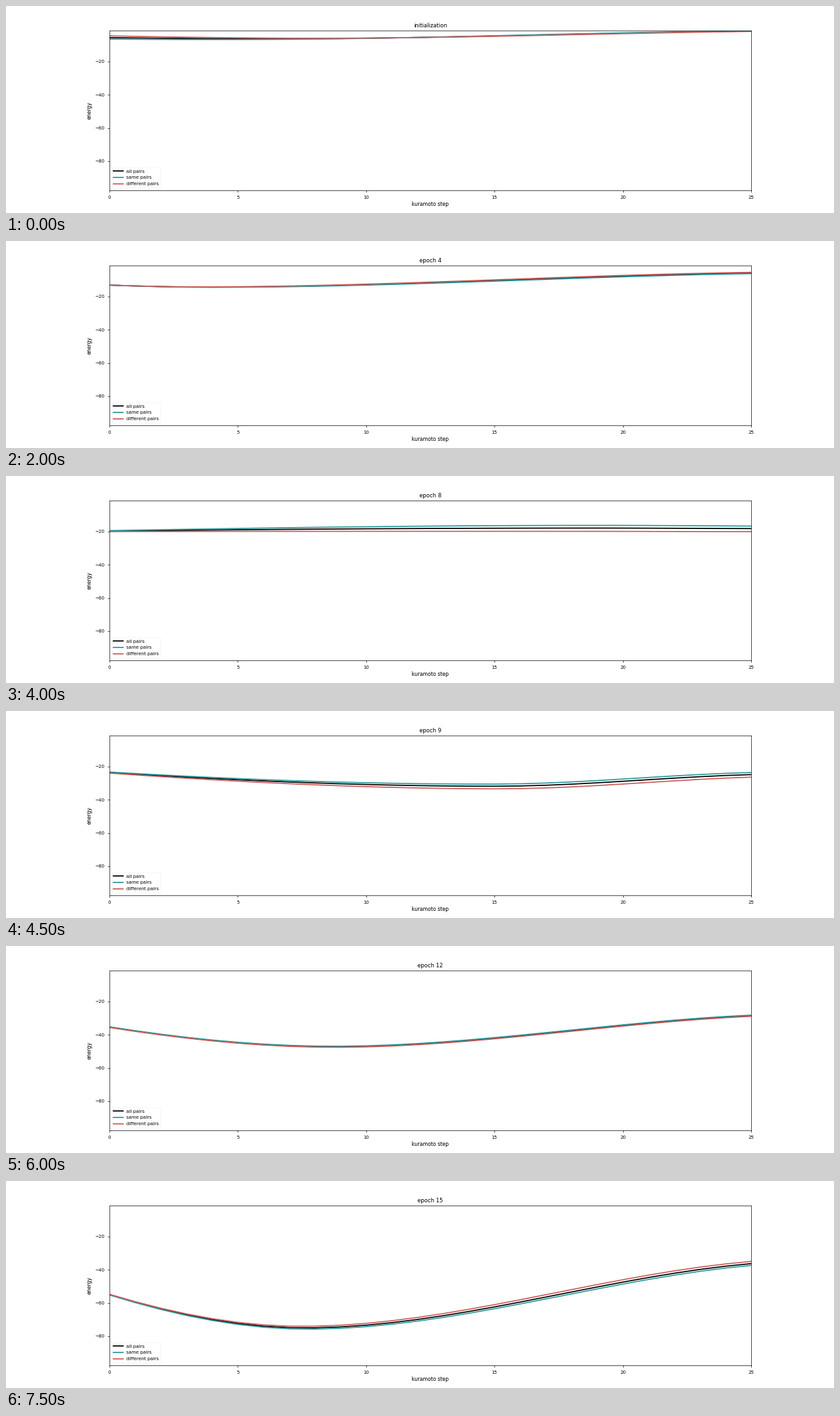
Animation of 1280x320 px, one loop 8 s. Source, as a matplotlib script:

```python
import numpy as np
import matplotlib.pyplot as plt
from matplotlib.animation import FuncAnimation

plt.rcParams.update({
    "font.family": "DejaVu Sans",
    "axes.titlesize": 9.6,
    "axes.labelsize": 8.8,
    "xtick.labelsize": 8,
    "ytick.labelsize": 8,
    "legend.fontsize": 8,
    "legend.labelspacing": 0.55,
    "xtick.major.pad": 5.6,
    "ytick.major.pad": 5.6,
    "axes.linewidth": 0.8,
    "patch.linewidth": 0.24,
    "lines.linewidth": 2.0,
})

EPOCHS = 16
LAST = 25
STEPS = np.arange(LAST + 1)
SAME_SHARE = 0.45

# Key epochs: start energy, turning step, turning energy, end energy,
# and the first and widest gap between different and same pairs.
KEYS = {
    0: (-5.6, 6.5, -6.3, -1.7, 1.95, -0.5),
    2: (-14.8, 5.5, -17.2, -5.6, 0.4, 3.6),
    6: (-11.4, 2, -11.4, -6.1, -0.5, -1.9),
    8: (-19.7, 19, -17.9, -18.2, -0.6, -3.6),
    10: (-27.5, 11, -45.8, -31.5, -0.7, -2.4),
    11: (-29.8, 10.5, -44.6, -31.0, -0.7, -2.3),
    13: (-41, 7, -49.8, -26, -0.1, 0.8),
    14: (-48.5, 6.9, -63, -27.1, 0.1, 1.6),
    15: (-55, 7.6, -75, -36.3, 0.4, 2.6),
}
TRACKS = list(zip(*KEYS.values()))


def ease(u, bend):
    """Leave 0 flat and reach 1; a larger bend slows the arrival."""
    return u ** 2 * (bend - (bend - 1) * u)


def energies(epoch):
    start, turn, low, end, gap0, gap1 = (
        np.interp(epoch, list(KEYS), track) for track in TRACKS)
    before = ease(np.clip((turn - STEPS) / turn, 0, 1), 1.2)
    after = ease(np.clip((STEPS - turn) / (LAST - turn), 0, 1), 2.4)
    mean = low + (start - low) * before + (end - low) * after
    gap = gap0 + (gap1 - gap0) * np.sin(2 * STEPS / LAST)
    return mean, mean - SAME_SHARE * gap, mean + (1 - SAME_SHARE) * gap


fig, ax = plt.subplots(figsize=(20, 5), dpi=64)
ax.set(xlim=(0, LAST), ylim=(-97.5, -1.5), xlabel="kuramoto step", ylabel="energy")
ax.set_xticks(range(0, LAST + 1, 5))
ax.set_yticks(range(-80, 0, 20))

STYLES = {"all pairs": "black", "same pairs": "#2a9a9c", "different pairs": "#cd5c5c"}
lines = [ax.plot([], [], color=color, label=label)[0] for label, color in STYLES.items()]
ax.legend(loc="lower left")
title = ax.set_title("initialization")


def update(epoch):
    for line, values in zip(lines, energies(epoch)):
        line.set_data(STEPS, values)
    title.set_text(f"epoch {epoch}" if epoch else "initialization")
    return [*lines, title]


anim = FuncAnimation(fig, update, frames=EPOCHS, interval=500, repeat=True)
plt.show()
```
